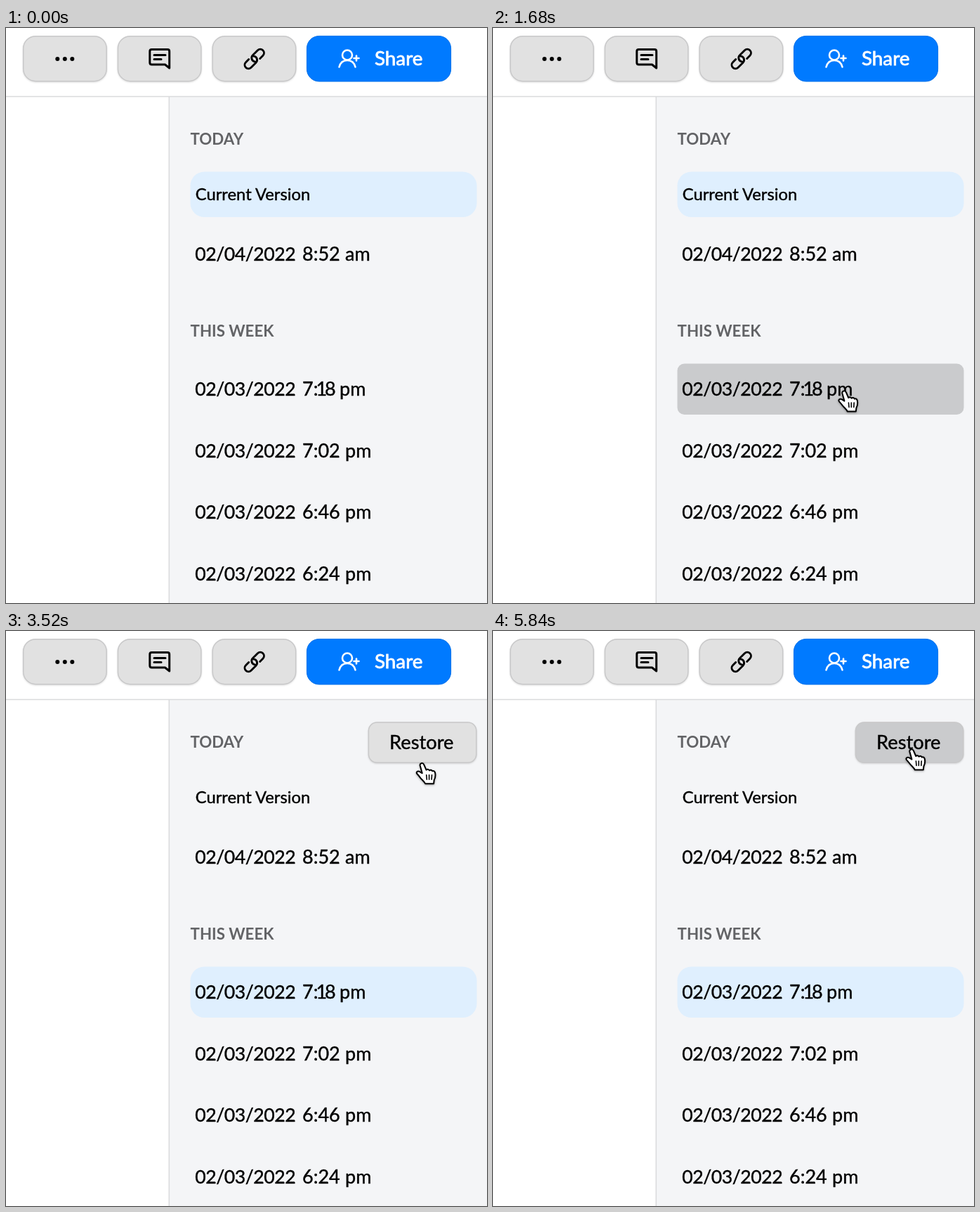
Animation of 685x818 px, one loop 5.92 s. Source, as an HTML page:

```html
<!DOCTYPE html>
<html lang="en">
<head>
<meta charset="utf-8">
<title>Version history</title>
<style>
  html, body { margin: 0; width: 100%; height: 100%; overflow: hidden; background: #fff; }
  svg { display: block; width: 100vw; height: 100vh; }
  text { font-family: Lato, "Open Sans", sans-serif; font-size: 27px; stroke: currentColor; stroke-width: .4; fill: currentColor; color: #000; }
  .head { font-size: 22.3px; font-weight: 700; stroke: none; color: #626366; }
  .date { font-size: 26.6px; letter-spacing: -.45px; }
  .btn { fill: #e1e1e1; stroke: #c8c8c9; stroke-width: 1.5; filter: drop-shadow(0 1px 1px #0002); }
  .icon { fill: none; stroke: #000; stroke-linecap: round; stroke-linejoin: round; }
</style>
</head>
<body>
<svg viewBox="0 0 685 818" xmlns="http://www.w3.org/2000/svg">
  <rect width="685" height="818" fill="#fff"/>
  <rect x="232" y="97" width="453" height="721" fill="#f4f5f7"/>
  <path d="M0 97.5H685M232.3 97V818" stroke="#d9dadc" stroke-width="1.5"/>

  <g id="bar"></g>
  <g><circle cx="73.3" cy="44" r="3"/><circle cx="83.8" cy="44" r="3"/><circle cx="94.3" cy="44" r="3"/></g>
  <path class="icon" stroke-width="3" d="M207.5 30.5H230Q232.7 30.5 232.7 33.2V57L226.5 52H207.5Q204.8 52 204.8 49.3V33.2Q204.8 30.5 207.5 30.5ZM211 38.5H227M211 44.5H221"/>
  <path class="icon" stroke-width="2.9" transform="translate(353.7 44) rotate(-45)" d="M-2.3 3.1A5.3 5.3 0 0 1 2-5.3H11.9A5.3 5.3 0 0 1 11.9 5.3H6M2.3-3.1A5.3 5.3 0 0 1-2 5.3H-11.9A5.3 5.3 0 0 1-11.9-5.3H-6"/>
  <rect x="428.4" y="11.4" width="205.2" height="64.6" rx="17.5" fill="#007aff" stroke="#0070ea"/>
  <g class="icon" style="stroke:#fff" stroke-width="2.6">
    <circle cx="486" cy="38.5" r="7"/>
    <path d="M474.5 55.5C476 49.5 480 46 486 46S496 49.5 497.5 55.5M495.5 43H502.5M499 39.5V46.5"/>
  </g>
  <text x="525" y="53" style="color:#fff;font-size:27.8px;stroke-width:.8">Share</text>

  <rect id="chosen" x="262.5" width="408" rx="20" fill="#dfeffe"/>
  <rect id="hover" x="262.5" width="408" rx="10" fill="#cacbcd"/>

  <text class="head" x="262.5" y="166">TODAY</text>
  <text class="head" x="262.5" y="439">THIS WEEK</text>
  <text x="269.7" y="244.5" style="font-size:23.8px">Current Version</text>
  <g id="rows"></g>

  <g id="restore">
    <rect id="restoreBox" class="btn" x="516.4" y="130" width="153.4" height="57.3" rx="12"/>
    <text x="546" y="168" style="font-size:27.3px">Restore</text>
  </g>

  <g id="pointer" style="filter:drop-shadow(0 1.5px 1.5px #0005)">
    <path id="arrow" fill="#000" stroke="#fff" stroke-width="2" stroke-linejoin="round" d="M1 1V26L6.8 20.8L11.2 31.3L15.2 29.6L10.8 19.3H18.8Z"/>
    <g id="hand" transform="translate(0 -1)" stroke-linejoin="round" stroke-linecap="round">
      <path fill="#fff" stroke="#000" stroke-width="2" d="M-3.6 1.8C-4.4-1.6.2-3.2 1.9.4L5.2 8C6.6 6.6 8.8 7 9.6 8.7C11 7.5 13 8 13.8 9.6C15.6 8.8 17.3 9.8 17.8 12C18.6 16 18.3 19 16.4 22.4L15.8 27.5H3.8C2.4 24.5-.5 22.4-3 19.4C-4.8 17-6.4 15-7.8 13.6C-9.8 11.2-7.2 8.8-4.6 10.2L-.6 12.6Z"/>
      <path fill="none" stroke="#000" stroke-width="1.6" d="M5.4 15L6 21.5M9.3 15V21.5M13.2 15L12.8 21.5"/>
    </g>
  </g>
</svg>
<script>
const $ = id => document.getElementById(id);
const LOOP = 5920, TICK = 40;
const CLICK = 1800, RESTORE_HOVER = 3560;

// top and height of each selectable row
const slots = {
  current: [204.5, 64.5], am: [284.5, 72.5], r718: [477.5, 72.5],
  r702: [565, 72.5], r646: [652.5, 72.5], r624: [740, 72.5]
};

// pointer path: time, x, y
const path = [
  [600, 436, 812], [640, 442, 775], [680, 448, 728], [720, 454, 678],
  [760, 460, 636], [800, 466, 610], [880, 475, 583], [1000, 479, 572],
  [1280, 479, 572], [1320, 481, 563], [1440, 495, 532], [1560, 501, 519],
  [3080, 501, 519], [3120, 505, 508], [3200, 531, 424], [3320, 569, 300],
  [3440, 588, 216], [3560, 596, 178], [3680, 597, 171]
];

const hovers = [
  [0, ""], [640, "r624"], [720, "r646"], [800, "r702"], [1400, "r718"],
  [CLICK, ""], [3280, "am"], [3400, "current"], [3520, ""]
];
const shapes = [[0, "arrow"], [800, "hand"], [3200, "arrow"], [3280, "hand"]];

function buildRows() {
  const rows = [
    ["02/04/2022", "8:52", "am", 330.5], ["02/03/2022", "7:18", "pm", 523],
    ["02/03/2022", "7:02", "pm", 611], ["02/03/2022", "6:46", "pm", 698],
    ["02/03/2022", "6:24", "pm", 786]
  ];
  $("rows").innerHTML = rows.map(([date, time, half, y]) => {
    const tight = time.includes("1");
    const clock = tight ? '7:<tspan dx="-3">1</tspan><tspan dx="-3">8</tspan>' : time;
    return `<text class="date" x="269.3" y="${y}">${date}</text><text x="422" y="${y}">${clock}</text>` +
      `<text x="${tight ? 475 : 483}" y="${y}">${half}</text>`;
  }).join("");
}

function buildBar() {
  $("bar").innerHTML = [24.7, 159.4, 294.2].map(x =>
    `<rect class="btn" x="${x}" y="11.7" width="118.5" height="64" rx="17.5"/>`).join("");
}

const latest = (list, t) => list.filter(e => e[0] <= t).pop()[1];

function pointAt(t) {
  const i = path.findIndex(p => p[0] > t);
  if (i < 0) return path[path.length - 1].slice(1);
  const a = path[i - 1], b = path[i], k = (t - a[0]) / (b[0] - a[0]);
  return [a[1] + (b[1] - a[1]) * k, a[2] + (b[2] - a[2]) * k];
}

const show = (el, on) => el.setAttribute("visibility", on ? "inherit" : "hidden");

function place(el, name) {
  show(el, !!name);
  if (!name) return;
  el.setAttribute("y", slots[name][0]);
  el.setAttribute("height", slots[name][1]);
}

function draw(now) {
  const t = Math.floor(now % LOOP / TICK) * TICK;
  place($("chosen"), t < CLICK ? "current" : "r718");
  place($("hover"), latest(hovers, t));
  show($("restore"), t >= CLICK);
  $("restoreBox").style.fill = t >= RESTORE_HOVER ? "#cacbcd" : "#e1e1e1";

  const visible = t >= path[0][0];
  show($("pointer"), visible);
  if (!visible) {
    show($("arrow"), false);
    show($("hand"), false);
    return;
  }
  const [x, y] = pointAt(t), shape = latest(shapes, t);
  $("pointer").setAttribute("transform", `translate(${x.toFixed(1)} ${y.toFixed(1)})`);
  show($("arrow"), shape === "arrow");
  show($("hand"), shape === "hand");
}

function loop() {
  draw(performance.now());
  requestAnimationFrame(loop);
}

buildBar();
buildRows();
loop();
</script>
</body>
</html>
```
